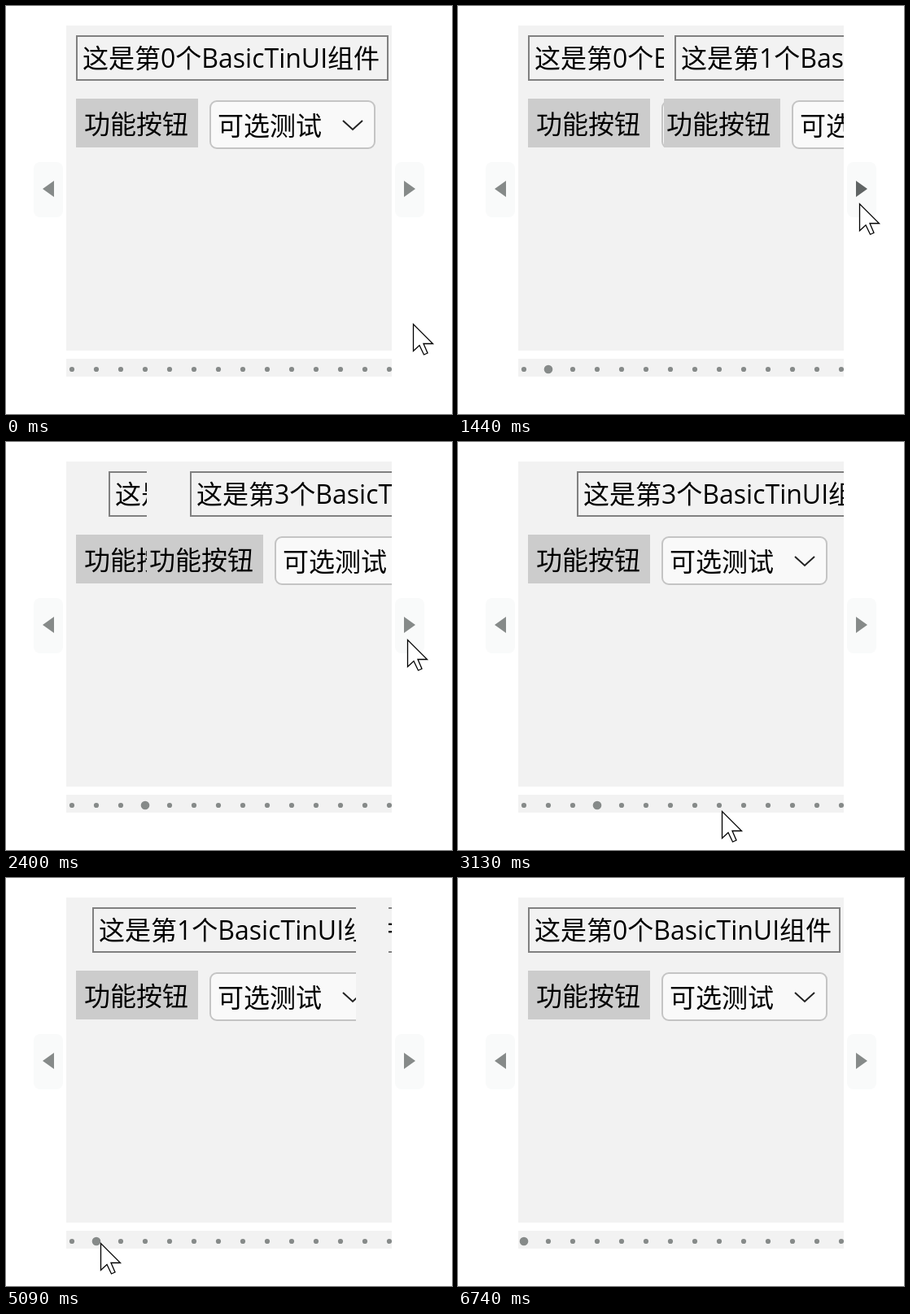
Recreate the animation shown at these times as an HTML page with a canvas. Size 548 px wide and 502 px high, loop 7850 ms.

```html
<!DOCTYPE html>
<html lang="zh">
<head>
<meta charset="utf-8">
<style>
  html, body { margin: 0; width: 100%; height: 100%; overflow: hidden; background: #fff; }
  canvas { display: block; }
</style>
</head>
<body>
<canvas id="stage" width="548" height="502"></canvas>
<script>
const ctx = document.getElementById('stage').getContext('2d');
const LOOP = 7850;
const PANEL = { x: 74, y: 24, size: 400 };
const GRAY = '#f2f2f2', MARK = '#868a89', MARK_HOVER = '#606464';
const FONT = '32px "Open Sans", "Noto Sans CJK SC", "Noto Sans CJK", sans-serif';
const LAST_FILLED_PAGE = 3;

const slides = [
  { start: 1200, from: 0, to: 1 },
  { start: 1670, from: 1, to: 2 },
  { start: 2080, from: 2, to: 3 },
  { start: 3590, from: 3, to: 8 },
  { start: 4880, from: 8, to: 1 },
  { start: 6110, from: 1, to: 0 },
];
const clicks = [1170, 1640, 2050, 3570, 4850, 6080];
const CLICK_LENGTH = 100;

// Pointer path: time, x, y
const path = [
  [230, 500, 391], [600, 503, 310], [930, 505, 222], [1270, 505, 222],
  [1420, 493, 243], [2480, 493, 243], [2760, 333, 441], [2900, 328, 456],
  [3040, 328, 456], [3300, 316, 450], [3670, 316, 450], [4000, 222, 456],
  [4360, 99, 452], [4530, 99, 452], [4650, 116, 449], [5090, 116, 449],
  [5620, 69, 232], [5780, 43, 230], [6180, 43, 230], [6400, 88, 290],
  [6600, 262, 432], [6740, 340, 504],
];

function pointerAt(t) {
  const next = path.findIndex(p => p[0] > t);
  if (next < 0) return null;
  if (next === 0) return path[0].slice(1);
  const [t0, x0, y0] = path[next - 1], [t1, x1, y1] = path[next];
  const k = (t - t0) / (t1 - t0);
  return [Math.round(x0 + (x1 - x0) * k), Math.round(y0 + (y1 - y0) * k)];
}

function rect(x, y, w, h, fill) {
  ctx.fillStyle = fill;
  ctx.fillRect(x, y, w, h);
}

function roundRect(x, y, w, h, r, fill, stroke) {
  ctx.beginPath();
  ctx.roundRect(x, y, w, h, r);
  ctx.fillStyle = fill;
  ctx.fill();
  if (stroke) {
    ctx.strokeStyle = stroke;
    ctx.lineWidth = 2;
    ctx.stroke();
  }
}

function polygon(points, fill) {
  ctx.beginPath();
  points.forEach(([x, y]) => ctx.lineTo(x, y));
  ctx.closePath();
  ctx.fillStyle = fill;
  ctx.fill();
}

function disc(x, y, r, fill) {
  ctx.beginPath();
  ctx.arc(x, y, r, 0, Math.PI * 2);
  ctx.fillStyle = fill;
  ctx.fill();
}

function text(string, x, baseline) {
  ctx.font = FONT;
  ctx.fillStyle = '#000';
  ctx.fillText(string, x, baseline);
}

// Draws a page shifted by dx, visible only between left and the panel's right edge
function drawPage(index, dx = 0, left = PANEL.x) {
  const right = PANEL.x + PANEL.size;
  if (left >= right) return;
  ctx.save();
  ctx.beginPath();
  ctx.rect(left, PANEL.y, right - left, PANEL.size);
  ctx.clip();
  rect(left, PANEL.y, right - left, PANEL.size, GRAY);
  if (index <= LAST_FILLED_PAGE) {
    ctx.translate(dx, 0);
    const titleX = 86 + 20 * index;
    ctx.strokeStyle = '#808080';
    ctx.lineWidth = 2;
    ctx.strokeRect(titleX + 1, 37, 382, 54);
    text(`这是第${index}个BasicTinUI组件`, titleX + 8, 76);
    rect(86, 114, 150, 60, '#cccccc');
    text('功能按钮', 96, 157);
    roundRect(251, 117, 202, 58, 8, '#f9f9f9', '#c4c4c4');
    text('可选测试', 260, 159);
    ctx.beginPath();
    ctx.moveTo(414, 141);
    ctx.lineTo(426, 152);
    ctx.lineTo(438, 141);
    ctx.strokeStyle = '#222';
    ctx.lineWidth = 2;
    ctx.stroke();
  }
  ctx.restore();
}

function drawPanel(slide, t) {
  if (!slide) return drawPage(0);
  const step = Math.floor((t - slide.start) / 20);
  if (slide.to > slide.from) {
    // The new page slides in; its leading edge is painted one step late
    const offset = Math.max(0, PANEL.size - 20 * step);
    drawPage(slide.from);
    drawPage(slide.to, offset, PANEL.x + (offset ? offset + 19 : 0));
  } else {
    // The old page slides away, leaving an unpainted strip behind it
    const edge = PANEL.x + 40 * step - 4;
    drawPage(slide.to);
    if (step > 10) return;
    const strip = Math.max(PANEL.x, edge - 40);
    if (edge > strip) rect(strip, PANEL.y, edge - strip, PANEL.size, GRAY);
    if (step < 10) drawPage(slide.from, edge - PANEL.x, Math.max(PANEL.x, edge));
  }
}

function drawDots(selected, hovered) {
  ctx.save();
  ctx.beginPath();
  ctx.rect(PANEL.x, 434, PANEL.size, 22);
  ctx.clip();
  rect(PANEL.x, 434, PANEL.size, 22, GRAY);
  for (let i = 0; i < 14; i++) {
    disc(81 + 30 * i, 447, i === selected || i === hovered ? 5.3 : 3.1, MARK);
  }
  ctx.restore();
}

function drawArrowButton(x, direction, hovered) {
  roundRect(x, 192, 36, 68, 8, '#f9fafa');
  const tip = x + 18 + 7 * direction, base = tip - 14 * direction;
  polygon([[tip, 225], [base, 215], [base, 235]], hovered ? MARK_HOVER : MARK);
}

function drawPointer([x, y]) {
  ctx.save();
  ctx.translate(x + 0.5, y + 0.5);
  polygon([[0, 0], [0, 33], [7.5, 26], [13, 37.5], [17.5, 35.5], [12.5, 24], [24, 24]], '#fff');
  ctx.strokeStyle = '#000';
  ctx.lineWidth = 1.3;
  ctx.stroke();
  ctx.restore();
}

function draw(t) {
  const within = (from, to) => t >= from && t < to;
  const slide = slides.filter(s => s.start <= t).pop();
  const hoveredDot = within(3260, 3590) ? 8 : within(4600, 4880) ? 1 : -1;

  rect(0, 0, 548, 502, '#fff');
  drawPanel(slide, t);
  drawDots(slide ? slide.to : -1, hoveredDot);
  drawArrowButton(34, -1, within(5700, 6240));
  drawArrowButton(478, 1, within(860, 2080));

  const pointer = pointerAt(t);
  if (!pointer) return;
  if (clicks.some(c => within(c, c + CLICK_LENGTH))) {
    ctx.globalCompositeOperation = 'multiply';
    disc(...pointer, 24, '#ffff78');
    ctx.globalCompositeOperation = 'source-over';
  }
  drawPointer(pointer);
}

const began = performance.now();
function tick() {
  draw((performance.now() - began) % LOOP);
  requestAnimationFrame(tick);
}
tick();
</script>
</body>
</html>
```
